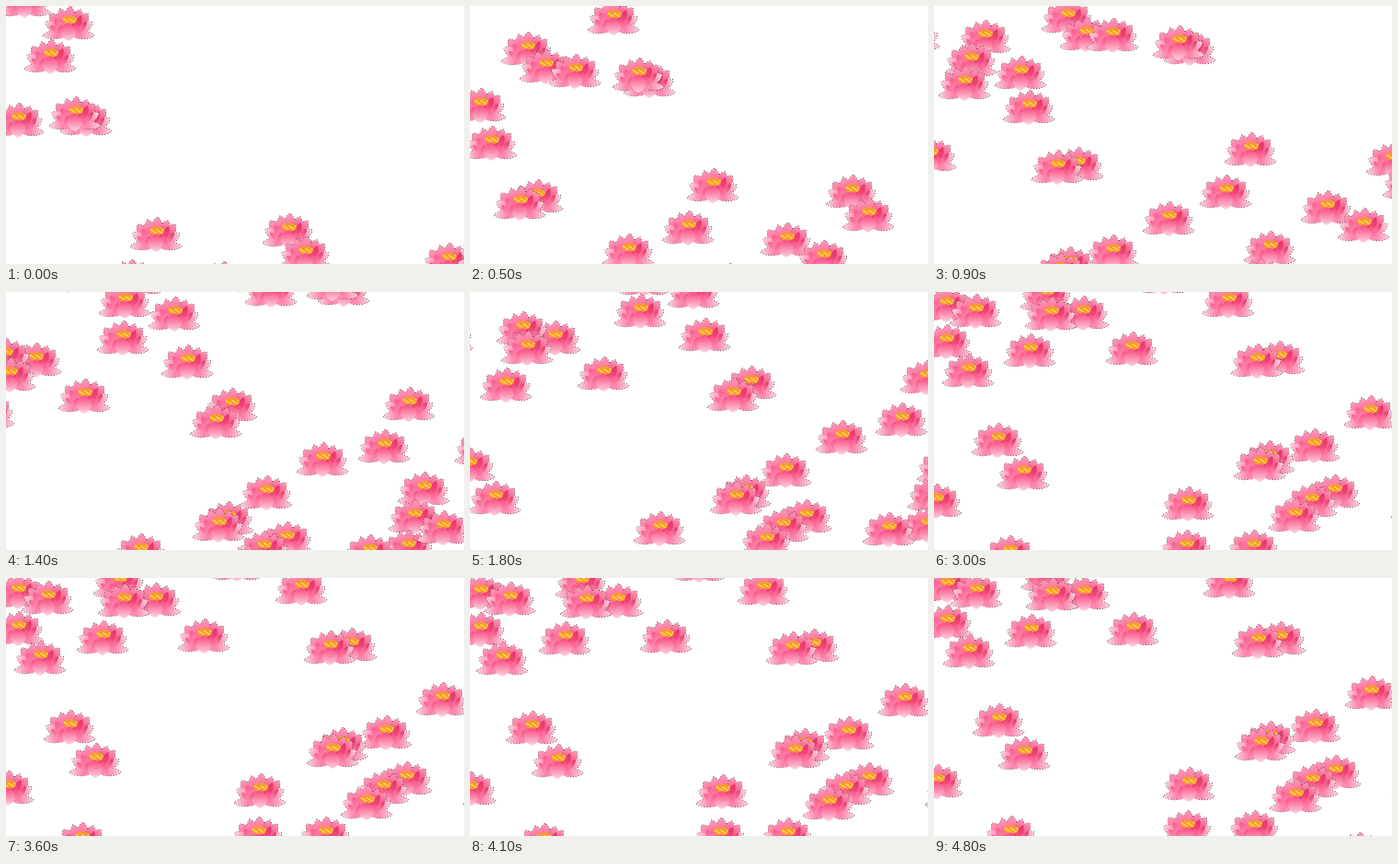
Recreate the animation shown at these times as an HTML page with a canvas. Size 498x280 px, loop 5100 ms.

```html
<!DOCTYPE html>
<html lang="en">
<head>
<meta charset="utf-8">
<title>Drifting lotus flowers</title>
<style>
html, body { margin: 0; width: 100%; height: 100%; overflow: hidden; background: #fff }
canvas { display: block }
</style>
</head>
<body>
<canvas id="stage" width="498" height="280"></canvas>
<script>
const LOOP = 5100, STEP = 100, LAST = 48;
const ctx = document.getElementById('stage').getContext('2d');

// Two drifting layers: each has flower centres and a path of offsets at the knots.
const knots = [0, 9, 14, 22, 30, 41, 48];
const layers = [
  {
    x: [-410, -219, -130, -23, 0, -2, 1],
    y: [177, 100, 51, 11, 0, 2, -6],
    flowers: [
      [430, -184], [478, -159], [458, -123], [364, -89], [384, -70], [274, -67],
      [197, -70], [497, -55], [485, -61], [259, -42], [313, -28], [717, 66],
      [735, 91], [891, 98], [929, 88], [646, 118], [686, 137], [584, 162],
      [574, 192], [567, 225], [605, 204], [525, 230], [461, 300],
      [13, 13], [45, 20], [13, 53], [37, 85], [162, 22], [215, 61], [375, 71],
      [474, 130], [413, 166], [69, 160], [97, 196], [2, 226], [276, 229],
      [435, 216], [410, 226], [392, 242], [274, 276], [347, 276], [82, 282]
    ]
  },
  {
    x: [-398, -217, -123, -21, 0, -1, 1],
    y: [192, 100, 66, 13, 0, 2, -6],
    flowers: [
      [411, -69], [250, -17], [320, 9], [122, 2], [127, 23], [104, 63],
      [561, 55], [534, 101], [351, 74], [364, 179], [354, 186]
    ]
  }
];

const deep = '#e62f63', rose = '#f9588a', pink = '#ff9abb', pale = '#ffd3e2';

function drawPetal(g, bx, by, tx, ty, w, from, to) {
  const dx = tx - bx, dy = ty - by, len = Math.hypot(dx, dy);
  const nx = -dy / len * w, ny = dx / len * w;
  const fill = g.createLinearGradient(bx, by, tx, ty);
  fill.addColorStop(0.15, from);
  fill.addColorStop(1, to);
  g.beginPath();
  g.moveTo(bx, by);
  g.bezierCurveTo(bx + dx * .3 + nx, by + dy * .3 + ny, bx + dx * .75 + nx, by + dy * .75 + ny, tx, ty);
  g.bezierCurveTo(bx + dx * .75 - nx, by + dy * .75 - ny, bx + dx * .3 - nx, by + dy * .3 - ny, bx, by);
  g.fillStyle = fill;
  g.fill();
}

function makeFlower() {
  const sprite = document.createElement('canvas');
  sprite.width = 60;
  sprite.height = 40;
  const g = sprite.getContext('2d');
  g.translate(30, 20);
  const outer = [
    [0, 8, 2, -18, 8, rose, pink],
    [-3, 8, -9, -15, 8, rose, pink],
    [4, 8, 13, -14, 8, deep, pink],
    [-5, 10, -20, -10, 8, rose, pink],
    [6, 10, 21, -10, 8, deep, pink],
    [-5, 12, -25, -1, 7, rose, pale],
    [5, 12, 26, 0, 7, rose, pale],
    [0, 12, -28, 14, 6, rose, pale],
    [0, 12, 28, 14, 6, rose, pale]
  ];
  const inner = [
    [-4, 13, -15, -5, 6, pink, rose],
    [5, 13, 14, -8, 5, rose, deep],
    [8, 13, 20, -1, 4, pink, deep],
    [-8, 13, -20, 3, 4, pink, rose]
  ];
  const front = [
    [-7, 2, -9, 18, 6, rose, pink],
    [8, 2, 10, 18, 6, rose, pink],
    [0, 0, 0, 20, 11, rose, pale]
  ];
  outer.concat(inner).forEach(p => drawPetal(g, ...p));

  // Yellow heart with short stamens.
  g.fillStyle = '#f59a3c';
  g.beginPath();
  g.ellipse(1, -3, 8, 5, 0, 0, 7);
  g.fill();
  g.fillStyle = '#ffd338';
  for (let i = 0; i < 9; i++) g.fillRect(-6 + i * 1.6, -5 + i * 5 % 4, 1.6, 2);
  front.forEach(p => drawPetal(g, ...p));

  // Thin broken rim, placed behind the petals.
  const rim = document.createElement('canvas');
  rim.width = 60;
  rim.height = 40;
  const r = rim.getContext('2d');
  r.translate(30, 20);
  r.setLineDash([1, 2]);
  r.strokeStyle = '#332';
  r.lineWidth = 1.2;
  for (const p of outer) {
    drawPetal(r, ...p);
    r.stroke();
  }
  r.setTransform(1, 0, 0, 1, 0, 0);
  r.drawImage(sprite, 0, 0);
  return rim;
}

// Smooth curve through the knots.
function follow(v, f) {
  const end = knots.length - 1;
  let i = 0;
  while (i < end - 1 && f >= knots[i + 1]) i++;
  const slope = k => {
    const a = Math.max(k - 1, 0), b = Math.min(k + 1, end);
    return (v[b] - v[a]) / (knots[b] - knots[a]);
  };
  const h = knots[i + 1] - knots[i], s = (f - knots[i]) / h, q = 1 - s;
  return v[i] * q * q * (1 + 2 * s) + v[i + 1] * s * s * (3 - 2 * s)
    + h * s * q * (slope(i) * q - slope(i + 1) * s);
}

const flower = makeFlower();
const start = performance.now();

function draw() {
  const time = (performance.now() - start) % LOOP;
  const f = Math.min(LAST, Math.floor(time / STEP));
  ctx.fillStyle = '#fff';
  ctx.fillRect(0, 0, 498, 280);
  for (const { x, y, flowers } of layers) {
    const ox = follow(x, f), oy = follow(y, f);
    for (const [cx, cy] of flowers) {
      ctx.drawImage(flower, Math.round(cx + ox) - 30, Math.round(cy + oy) - 20);
    }
  }
  requestAnimationFrame(draw);
}
draw();
</script>
</body>
</html>
```
